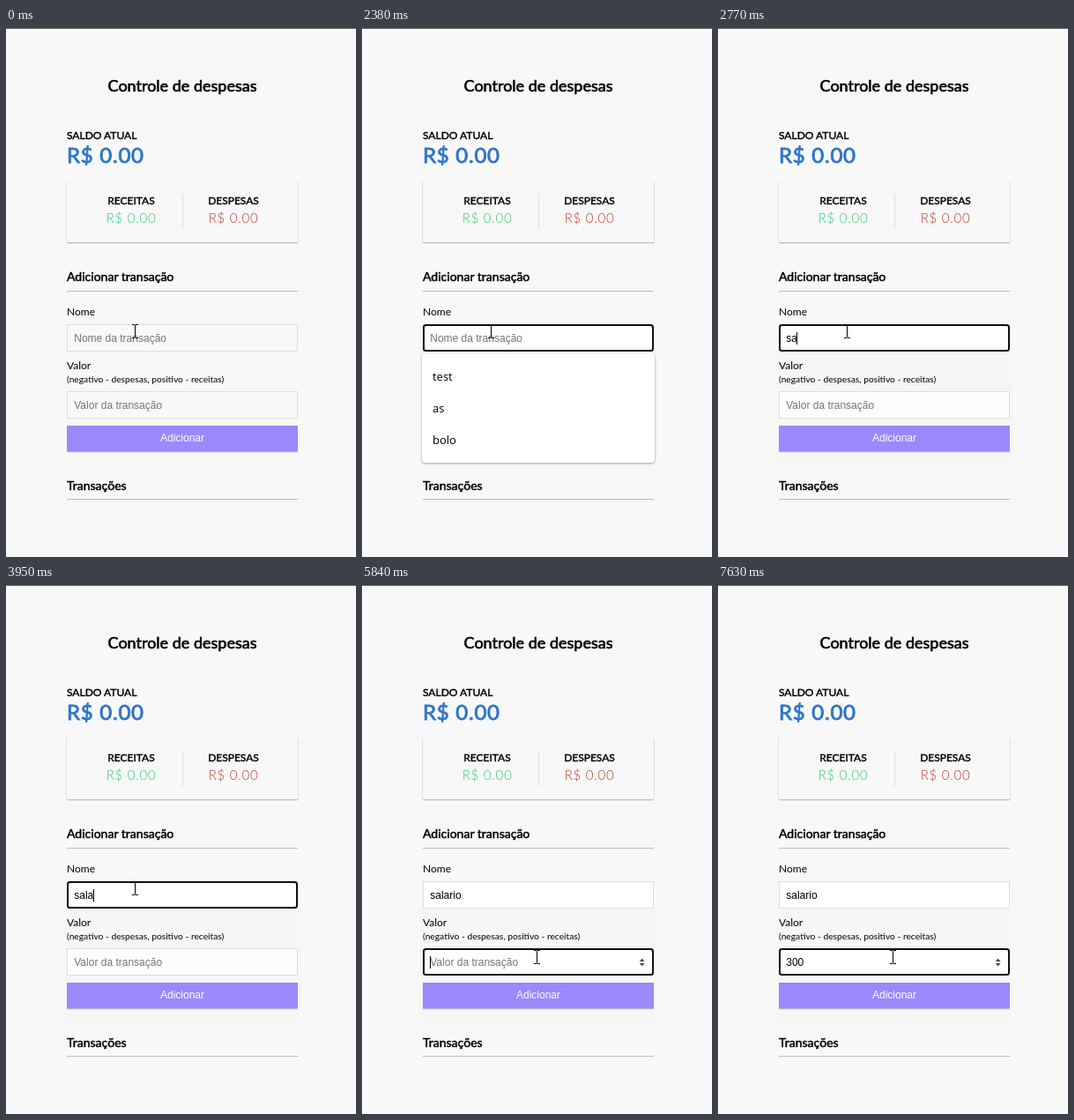
Animation, 397 px wide and 600 px high, one loop 8000 ms. Source, as an HTML page:

```html
<!DOCTYPE html>
<html lang="pt">
<head>
<meta charset="utf-8">
<title>Controle de despesas</title>
<style>
  html, body { margin: 0; width: 100%; height: 100%; overflow: hidden; background: #f8f8f8; }
  svg { display: block; width: 397px; height: 600px; }
  text { font-family: Lato, sans-serif; font-size: 12px; fill: #000; white-space: pre; }
  .bold { stroke: #000; stroke-width: .035em; }
  .title { font-size: 18px; }
  .section { font-size: 14.04px; }
  .balance { font-size: 24px; letter-spacing: .75px; fill: #2f74c8; stroke: #2f74c8; }
  .money { font-size: 15px; font-weight: 300; letter-spacing: .75px; }
  .hint { font-size: 10.25px; }
  .ui { font-family: "Liberation Sans", Arial, sans-serif; }
  .option { font-family: "Open Sans", sans-serif; font-size: 13px; }
  .mid { text-anchor: middle; }
  .popup { filter: drop-shadow(0 1px 1.5px rgba(0, 0, 0, .35)); }
</style>
</head>
<body>
<svg id="stage" viewBox="0 0 397 600"></svg>
<script>
const stage = document.getElementById('stage');

function add(tag, attrs, parent = stage) {
  const node = document.createElementNS('http://www.w3.org/2000/svg', tag);
  for (const key in attrs) node.setAttribute(key, attrs[key]);
  parent.appendChild(node);
  return node;
}
const rect = (x, y, width, height, fill, more, parent) =>
  add('rect', { x, y, width, height, fill, ...more }, parent);
function label(x, y, content, cls = '', more, parent) {
  const node = add('text', { x, y, class: cls, ...more }, parent);
  node.textContent = content;
  return node;
}
const show = (node, on) => node.setAttribute('visibility', on ? 'visible' : 'hidden');

function field(y, hint) {
  const g = add('g', {});
  return {
    hint,
    box: rect(69.5, y + .5, 261, 30, '#fff', { stroke: '#dedede' }, g),
    ring: rect(70, y + 1, 260, 29, '#fff', { rx: 2.5, stroke: '#101010', 'stroke-width': 2 }, g),
    text: label(77.25, y + 20, hint, 'ui', {}, g),
    caret: rect(77, y + 9, 1, 14, '#000', {}, g)
  };
}

function drawField(f, value, focused, caretOn, fill) {
  f.box.setAttribute('fill', fill);
  show(f.ring, focused);
  f.text.textContent = value || f.hint;
  f.text.style.fill = value ? '#000' : '#757575';
  show(f.caret, focused && caretOn);
  const width = value ? f.text.getComputedTextLength() : 0;
  f.caret.setAttribute('x', Math.floor(77.25 + width));
}

// Static page
rect(0, 0, 397, 600, '#f8f8f8');
rect(0, 0, 397, 1, '#5c5c5c');
label(200, 72, 'Controle de despesas', 'bold title mid');
label(69, 126, 'SALDO ATUAL', 'bold');
label(69, 153, 'R$ 0.00', 'bold balance');

rect(68, 174, 1, 69, '#e0e0e0');
rect(331, 174, 1, 69, '#e0e0e0');
rect(69, 243, 262, 1, '#bebebe');
rect(69, 244, 262, 1, '#e6e6e6');
rect(200, 188, 1, 40, '#dedede');
label(142, 200, 'RECEITAS', 'bold mid');
label(258, 200, 'DESPESAS', 'bold mid');
label(142, 221, 'R$ 0.00', 'money mid', { style: 'fill:#2ecc71' });
label(258, 221, 'R$ 0.00', 'money mid', { style: 'fill:#c0392b' });

label(69, 287, 'Adicionar transação', 'bold section');
rect(69, 298, 262, 1, '#bbb');
label(69, 326, 'Nome');

const patch = rect(66, 367, 268, 130, '#f6f6f6');
label(69, 387, 'Valor');
label(69, 402, '(negativo - despesas, positivo - receitas)', 'hint');
const nameField = field(336, 'Nome da transação');
const valueField = field(412, 'Valor da transação');
const spinner = add('path', { d: 'M314.8 427h5.8l-2.9-3.4zM314.8 429h5.8l-2.9 3.4z', fill: '#505050' });

rect(69, 480, 262, 1, '#b9b5cc');
rect(69, 481, 262, 1, '#e4e3e8');
rect(69, 451, 262, 29, '#9c88ff');
label(200, 469, 'Adicionar', 'ui mid', { style: 'fill:#fff' });
label(69, 524, 'Transações', 'bold section');
rect(69, 534, 262, 1, '#bbb');

const popup = add('g', { class: 'popup' });
rect(68, 369, 264, 124, '#fff', { rx: 4 }, popup);
['test', 'as', 'bolo'].forEach((word, i) => label(80, 400 + 36 * i, word, 'option', {}, popup));

const pointer = add('path', {
  d: 'M-3.5 -7.5h2.5M1 -7.5h2.5M-1 -7.5q1 0 1 1V6.5q0 1 -1 1h-2.5M1 -7.5q-1 0 -1 1M0 6.5q0 1 1 1h2.5',
  fill: 'none', stroke: '#000'
});

// Timelines: [start in ms, value]
const nameTyped = [[0, ''], [2640, 's'], [2770, 'sa'], [3950, 'sala'], [4380, 'salari'], [4530, 'salario']];
const valueTyped = [[0, ''], [6790, '3'], [6950, '30'], [7070, '300']];
const caretShown = [[0, false], [810, true], [1370, false], [1830, true], [2380, false], [2640, true],
  [3230, false], [3800, true], [5070, false], [5590, true], [6420, false], [6790, true], [7630, false]];
const travel = [[0, 0], [5350, .12], [5470, .48], [5590, .82], [5710, 1]];
const at = (track, t) => track.reduce((now, [start, value]) => t >= start ? value : now, null);

const LOOP = 8000, OPEN = 810, CLOSE = 2770, HOVER = 5710, SWITCH = 5840;

function render(t) {
  const caretOn = at(caretShown, t);
  drawField(nameField, at(nameTyped, t), t >= OPEN && t < SWITCH, caretOn, t < OPEN ? '#f9f9f9' : '#fff');
  drawField(valueField, at(valueTyped, t), t >= SWITCH, caretOn, t < CLOSE ? '#f9f9f9' : '#fdfdfd');
  show(popup, t >= OPEN && t < CLOSE);
  show(patch, t >= CLOSE);
  show(spinner, t >= HOVER);
  const p = at(travel, t);
  pointer.setAttribute('transform', `translate(${Math.round(146 + 52 * p) + .5} ${Math.round(344 + 78 * p)})`);
}

const begin = performance.now();
function tick() {
  render((performance.now() - begin) % LOOP);
  requestAnimationFrame(tick);
}
tick();
</script>
</body>
</html>
```
